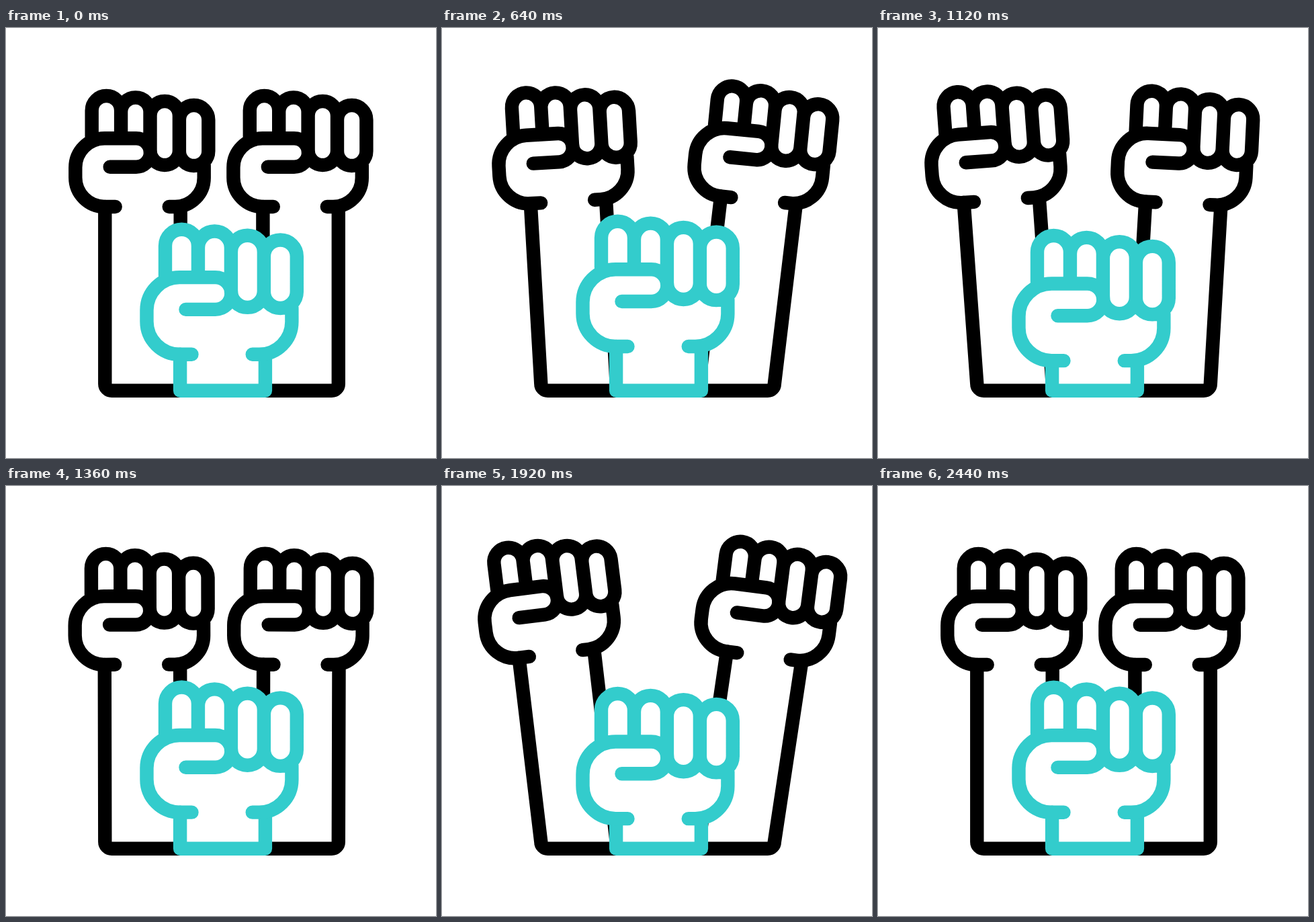
Animation of 640x640 px, one loop 2.6 s. Source, as an HTML page with a canvas:

```html
<!DOCTYPE html>
<html lang="en">
<head>
<meta charset="utf-8">
<title>Raised fists</title>
<style>
  html, body { margin: 0; width: 100%; height: 100%; overflow: hidden; background: #fff; }
  canvas { display: block; }
</style>
</head>
<body>
<canvas id="stage" width="640" height="640"></canvas>
<script>
const ctx = document.getElementById('stage').getContext('2d');
const LOOP = 2600, STEP = 40, DELAY = 200;
const BASE = 539.7, CORNER = 10, SCALE = 1.128;
const ARM_L = -55.4, ARM_R = 57;   // arm edges relative to the wrist centre
const LEFT_X = 202.7, RIGHT_X = 437.8, FRONT_X = 321.6, WRIST_Y = 266, FRONT_Y = 485.8;

// Fist outline around the wrist centre
function makeFist() {
  const line = new Path2D(), mask = new Path2D();
  const w = 43.4, r = w / 2, x0 = -75;

  [-165, -162.5].forEach((top, i) => {
    const x = x0 + i * w;
    line.moveTo(x, -104);
    line.lineTo(x, top + r);
    line.arc(x + r, top + r, r, Math.PI, 0);
    line.lineTo(x + w, -104);
    mask.roundRect(x, top, w, 90, r);
  });
  [[-157, -62], [-151, -61]].forEach(([top, bottom], i) => {
    const box = [x0 + (i + 2) * w, top, w, bottom - top, r];
    line.roundRect(...box);
    mask.roundRect(...box);
  });

  // thumb and left side of the palm
  line.moveTo(-40, 0);
  line.lineTo(-56, 0);
  line.arcTo(-99.4, 0, -99.4, -43, 43.4);
  line.arcTo(-99.4, -101.7, -56, -101.7, 43.4);
  line.lineTo(-9, -101.7);
  line.arc(-9, -80.5, 21.2, -Math.PI / 2, Math.PI / 2);
  line.lineTo(-48, -59.3);

  // right side of the palm
  line.moveTo(92, -62);
  line.lineTo(92, -43);
  line.arcTo(92, 0, 49, 0, 43);
  line.lineTo(40, 0);

  mask.roundRect(-99, -101.7, 191, 101.7, 43);
  return { line, mask };
}

function enlarge(path) {
  const p = new Path2D();
  p.addPath(path, new DOMMatrix([SCALE, 0, 0, SCALE, 0, 0]));
  return p;
}

const fist = makeFist();
const bigFist = { line: enlarge(fist.line), mask: enlarge(fist.mask) };

const ease = u => (1 - Math.cos(Math.PI * Math.min(1, Math.max(0, u)))) / 2;

// Two smooth swings of 25 steps each
function swing(k, start) {
  const u = Math.min(50, Math.max(0, k - start));
  return (1 - Math.cos(2 * Math.PI * u / 25)) / 2;
}

// Vertical pumping of the front fist
function pump(k) {
  if (k < 5) return 13 * ease(k / 5);
  if (k > 45) return 13 * (1 - ease((k - 45) / 5));
  return -6 + 19 * Math.cos(Math.PI * (k - 5) / 10);
}

function sidePose(x, amount, dx, dy, deg) {
  return { x: x + dx * amount, y: WRIST_Y + dy * amount, a: deg * amount * Math.PI / 180 };
}

const wristPoint = (p, off) => [p.x + off * Math.cos(p.a), p.y + off * Math.sin(p.a)];

function drawSideFist(p) {
  ctx.save();
  ctx.translate(p.x, p.y);
  ctx.rotate(p.a);
  ctx.stroke(fist.line);
  ctx.restore();
}

// The arms bend just above the fixed bottom bar
function drawArms(l, r) {
  const left = LEFT_X + ARM_L, right = RIGHT_X + ARM_R, foot = BASE - CORNER;
  ctx.beginPath();
  ctx.moveTo(...wristPoint(l, ARM_L));
  ctx.lineTo(left, foot);
  ctx.arcTo(left, BASE, right, BASE, CORNER);
  ctx.arcTo(right, BASE, right, foot, CORNER);
  ctx.lineTo(...wristPoint(r, ARM_R));
  ctx.moveTo(...wristPoint(l, ARM_R));
  ctx.lineTo(LEFT_X + ARM_R, foot);
  ctx.moveTo(...wristPoint(r, ARM_L));
  ctx.lineTo(RIGHT_X + ARM_L, foot);
  ctx.stroke();
}

function drawFront(y) {
  const x1 = ARM_L * SCALE, x2 = ARM_R * SCALE, h = BASE - y;
  ctx.save();
  ctx.translate(FRONT_X, y);
  ctx.fillStyle = '#fff';
  ctx.fill(bigFist.mask);
  ctx.fillRect(x1, -20, x2 - x1, h + 20);
  ctx.strokeStyle = '#33cccc';
  ctx.beginPath();
  ctx.moveTo(x1, 0);
  ctx.lineTo(x1, h);
  ctx.lineTo(x2, h);
  ctx.lineTo(x2, 0);
  ctx.stroke();
  ctx.stroke(bigFist.line);
  ctx.restore();
}

function draw(ms) {
  const k = Math.min(56, Math.max(0, Math.floor((ms - DELAY) / STEP)));
  const l = sidePose(LEFT_X, swing(k, 5), -33.3, -17, -7.1);
  const r = sidePose(RIGHT_X, swing(k, 3), 45.5, -14, 8);

  ctx.fillStyle = '#fff';
  ctx.fillRect(0, 0, 640, 640);
  ctx.lineWidth = 20.4;
  ctx.lineCap = ctx.lineJoin = 'round';
  ctx.strokeStyle = '#000';
  drawArms(l, r);
  drawSideFist(l);
  drawSideFist(r);
  drawFront(FRONT_Y + pump(k));
}

function tick() {
  draw(performance.now() % LOOP);
  requestAnimationFrame(tick);
}
tick();
</script>
</body>
</html>
```
